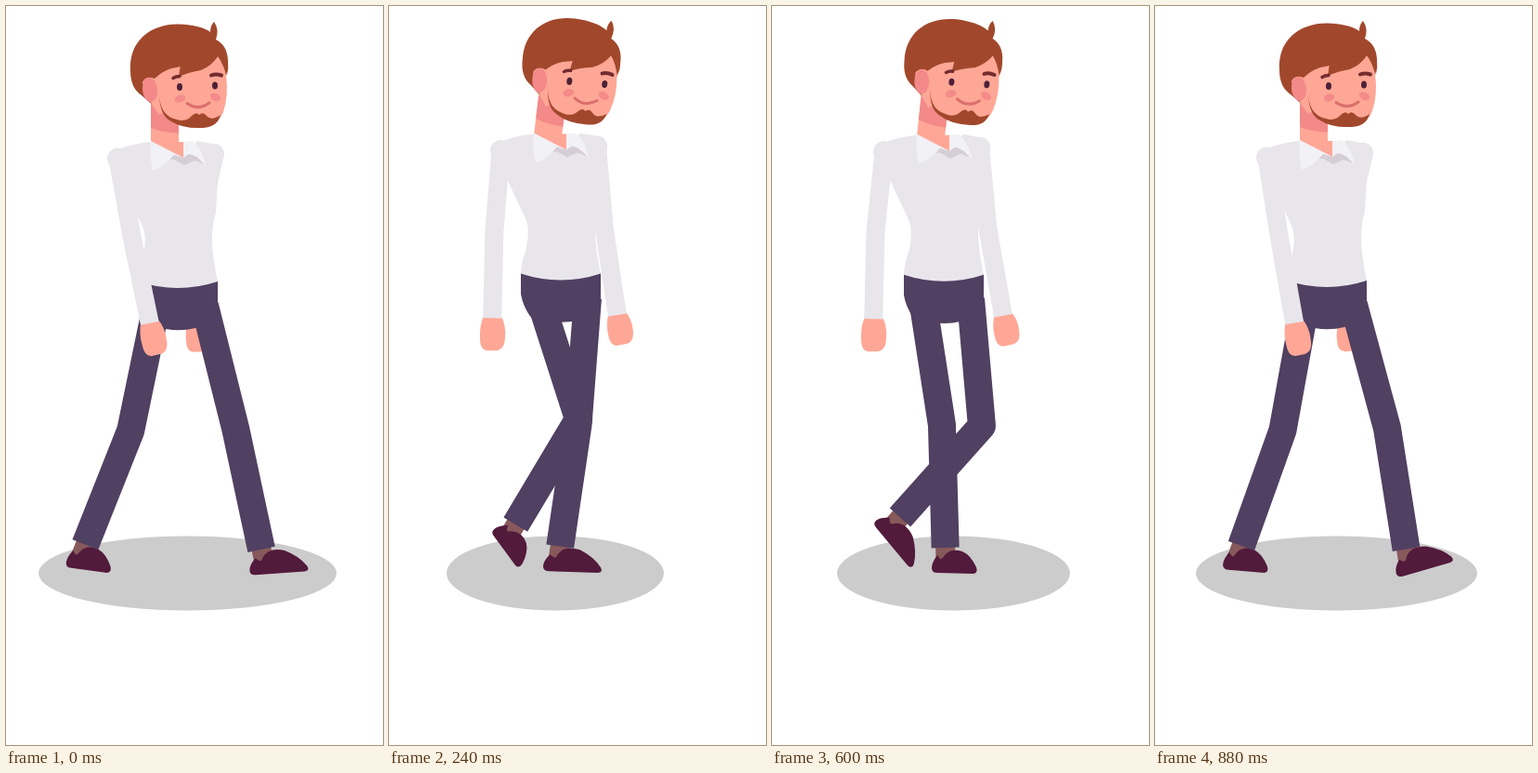
Animation of 406 by 794 pixels, one loop 0.92 s. Source, as an HTML page:

```html
<!DOCTYPE html>
<html lang="en">
<head>
<meta charset="utf-8">
<title>Walk cycle</title>
<style>
  html, body { margin: 0; width: 100%; height: 100%; overflow: hidden; background: #fff; }
  svg { display: block; width: 100vw; height: 100vh; }
  .skin { fill: #ffa796; }
  .rose { fill: #f38989; }
  .hair { fill: #a1482c; }
  .shirt { fill: #e8e6eb; }
  .pants { fill: #504061; }
  .shoe { fill: #521a3b; }
  .sleeve, .leg, .sock { fill: none; stroke-linejoin: round; }
  .sleeve { stroke: #e8e6eb; stroke-width: 20; }
  .leg { stroke: #504061; stroke-width: 30; }
  .sock { stroke: #87595a; stroke-width: 21; }
</style>
</head>
<body>
<svg viewBox="0 0 406 794">
  <defs>
    <path id="hand" class="skin" d="M-9-3H9Q15 8 13.500 21Q13 34 4 35H-6Q-14 34-13.500 21Q-14 8-9-3Z"/>
  </defs>
  <ellipse id="shadow" cy="609.500" ry="40" fill="#ccc"/>

  <g id="armR">
    <use href="#hand"/>
    <path class="sleeve"/>
    <circle class="shirt" r="11"/>
  </g>
  <g id="legR">
    <path class="sock"/>
    <path class="shoe" d="M-9-4Q-16 3-16 9Q-16 14-10 14L43 14Q49 13 46 8Q38-3 23-10Q6-15-1-4Q-2 0-5-1Z"/>
    <path class="leg"/>
  </g>
  <g id="legL">
    <path class="sock"/>
    <path class="shoe" d="M-9-5Q-15 3-15 9Q-15 14-9 14L30 15Q35 14 33 8Q27-5 18-9Q6-13-1-5Q-4 0-6-1Z"/>
    <path class="leg"/>
  </g>

  <g id="body">
    <path class="pants" d="M142 295Q185 309 228 295V322L222 342L204 346Q188 350 172 347L152 342Q144 330 142 318Z"/>
    <g id="head">
      <path class="skin" d="M156 100H186V152L172 160L156 152Z"/>
      <path class="rose" d="M156 106L186 126V136.500Q168 136 156 131Z"/>
      <path class="hair" d="M164 113Q156 104 146 96Q134 88 134 70C132 38 155 19.500 185 19.500Q209 20 220 28Q220 21 224 17Q230 25 226 36Q238 42 239 58Q239 67 237 76L186 82Z"/>
      <path class="skin" d="M147 82Q150 75 160 77Q172 67 184 66L228 54Q234 62 237 74Q240 96 234 114Q229 127 212 128Q186 130 170 114L165 117Q150 98 147 82Z"/>
      <path class="hair" d="M160 78Q170 68 184 65Q187 62 189 56L186 76Q197 71 210 69Q222 64 229 53Q236 61 238 74Q242 60 234 48L190 36L150 50L147 80Q152 74 160 78Z"/>
      <ellipse class="rose" cx="155" cy="90" rx="8" ry="13" transform="rotate(-6 155 90)"/>
      <path class="hair" d="M165 93Q165 118 184 122Q194 125 200 118Q205 113 208 117Q212 113 216 118Q221 124 231 117Q228 130 212 131Q190 132 178 124Q165 118 165 93Z"/>
      <g class="rose" opacity=".9">
        <ellipse cx="187.500" cy="99.500" rx="6" ry="4" transform="rotate(-20 187.500 99.500)"/>
        <ellipse cx="225.500" cy="98" rx="6" ry="4" transform="rotate(25 225.500 98)"/>
      </g>
      <g fill="#4d2138">
        <ellipse cx="187" cy="87" rx="3" ry="4"/>
        <ellipse cx="225" cy="85.500" rx="3" ry="4"/>
      </g>
      <g fill="none" stroke-linecap="round">
        <path d="M180 77.500Q183 75.500 187 75.500" stroke="#742c2f" stroke-width="3.500"/>
        <path d="M221 74.500Q226 72.500 232 74.500" stroke="#742c2f" stroke-width="4"/>
        <path d="M195 104.500Q207 113 219 104" stroke="#d96f6c" stroke-width="3"/>
      </g>
    </g>
    <path class="skin" d="M156 145L191 165L192 146H184Z"/>
    <path class="shirt" d="M156 146Q126 149 113 159L125 190L148 239Q152 252 147 272Q142 286 142 296Q185 310 228 296Q222 268 222 250Q222 235 226 222L228 190L235 160Q233 148 222 148L206 145L191 163Z"/>
    <path fill="#d6ced7" d="M173 165L181 159L191 163L196 158L205 161L213 170L203 166L192 171L181 165Z"/>
    <path fill="#f2f1f5" d="M156 145L191 163L181 160Q170 173 158 177Q154 160 156 145ZM191 146L201 145Q211 152 215 172Q206 160 197 159L191 163Z"/>
  </g>

  <g id="armL">
    <use href="#hand"/>
    <path class="sleeve"/>
    <circle class="shirt" r="11.500"/>
  </g>
</svg>

<script>
const LOOP = 920, STEP = 40;
const $ = id => document.getElementById(id);

// Angles in degrees from straight down, positive towards the right.
const stride = { period: LOOP, at: [0, 120, 240, 360, 480, 600, 760, 880] };
const bounce = { period: LOOP / 2, at: [0, 120, 180, 240, 300, 360, 420] };

const limbs = [
  { el: $('armL'), x: 120.5, y: 164, len: [87, 93], palm: 1,
    upper: [10.2, 3, -4.7, -10.9, -12.5, -6, 3.6, 8.9],
    lower: [11.7, 4.3, -1.3, -5.7, -6.5, -1.3, 4.5, 10] },
  { el: $('armR'), x: 224, y: 159, len: [88, 95], palm: .92,
    upper: [-14, -4.7, 5, 11.8, 13.5, 5.5, -6, -13],
    lower: [2, 5.5, 8.6, 17, 19, 10, 4.3, 2.3] },
  { el: $('legL'), x: 162, y: 322, len: [137, 132],
    upper: [-11.7, 5.5, 17.9, 20.9, 17.8, 8.8, -2.9, -10.3],
    lower: [-21.7, -36.1, -30.9, 9.5, 12, 1.6, -11.3, -19.7],
    foot: [6, 50, 52, -38, -4, 0, 1, 3.5] },
  { el: $('legR'), x: 214, y: 322, len: [137, 132],
    upper: [14.1, 4.4, -4.4, -13.4, -13.8, 5, 15.4, 15.2],
    lower: [12.1, 1.5, -8.4, -17, -27, -41.8, -23.5, 9],
    foot: [-4, 0, 2, 5, 12, 50, 19, -16] }
];
const bob = [0, -6.5, -8.5, -8.5, -6.5, -2, -1];
const nod = [0, 5.5, 7, 7, 5.5, 0, 0];
const shadowWidth = [321, 258, 240, 234, 251, 286, 303];
const shadowShift = [0, -12.5, -16.5, -6.5, 0, 0, 0, 0];

// Smooth periodic curve through the keys.
function sample({ period, at }, vals, time) {
  const n = at.length, t = time % period;
  const T = i => at[(i + n) % n] + Math.floor(i / n) * period;
  const V = i => vals[(i + n) % n];
  const slope = i => (V(i + 1) - V(i)) / (T(i + 1) - T(i));
  const tangent = i => {
    const a = T(i) - T(i - 1), b = T(i + 1) - T(i);
    return (slope(i - 1) * b + slope(i) * a) / (a + b);
  };
  let i = n - 1;
  while (at[i] > t) i--;
  const h = T(i + 1) - T(i), u = (t - T(i)) / h, w = 1 - u;
  return V(i) * (1 + 2 * u) * w * w + V(i + 1) * (3 - 2 * u) * u * u
    + h * u * w * (tangent(i) * w - tangent(i + 1) * u);
}

function along([x, y], deg, len) {
  const a = deg * Math.PI / 180;
  return [x + Math.sin(a) * len, y + Math.cos(a) * len];
}

const line = (...pts) => 'M' + pts.map(p => p.join()).join('L');

function pose(limb, t, dy) {
  const a = sample(stride, limb.upper, t), b = sample(stride, limb.lower, t);
  const root = [limb.x, limb.y + dy];
  const joint = along(root, a, limb.len[0]);
  const end = along(joint, b, limb.len[1]);
  const [p, q, r] = limb.el.children;
  if (limb.foot) {
    const ankle = along(end, b, 13);
    p.setAttribute('d', line(along(end, b, -3), along(end, b, 14)));
    q.setAttribute('transform', `translate(${ankle}) rotate(${sample(stride, limb.foot, t)})`);
    r.setAttribute('d', line(root, joint, end));
  } else {
    p.setAttribute('transform', `translate(${end}) rotate(${-b - 2}) scale(1 ${limb.palm})`);
    q.setAttribute('d', line(root, joint, end));
    r.setAttribute('transform', `translate(${root})`);
  }
}

function draw() {
  const t = Math.floor(performance.now() % LOOP / STEP) * STEP;
  const dy = sample(bounce, bob, t);
  limbs.forEach(limb => pose(limb, t, dy));
  $('body').setAttribute('transform', `translate(0 ${dy})`);
  $('head').setAttribute('transform', `rotate(${sample(bounce, nod, t)} 172 148)`);
  $('shadow').setAttribute('cx', 195.5 + sample(stride, shadowShift, t));
  $('shadow').setAttribute('rx', sample(bounce, shadowWidth, t) / 2);
  requestAnimationFrame(draw);
}
draw();
</script>
</body>
</html>
```
